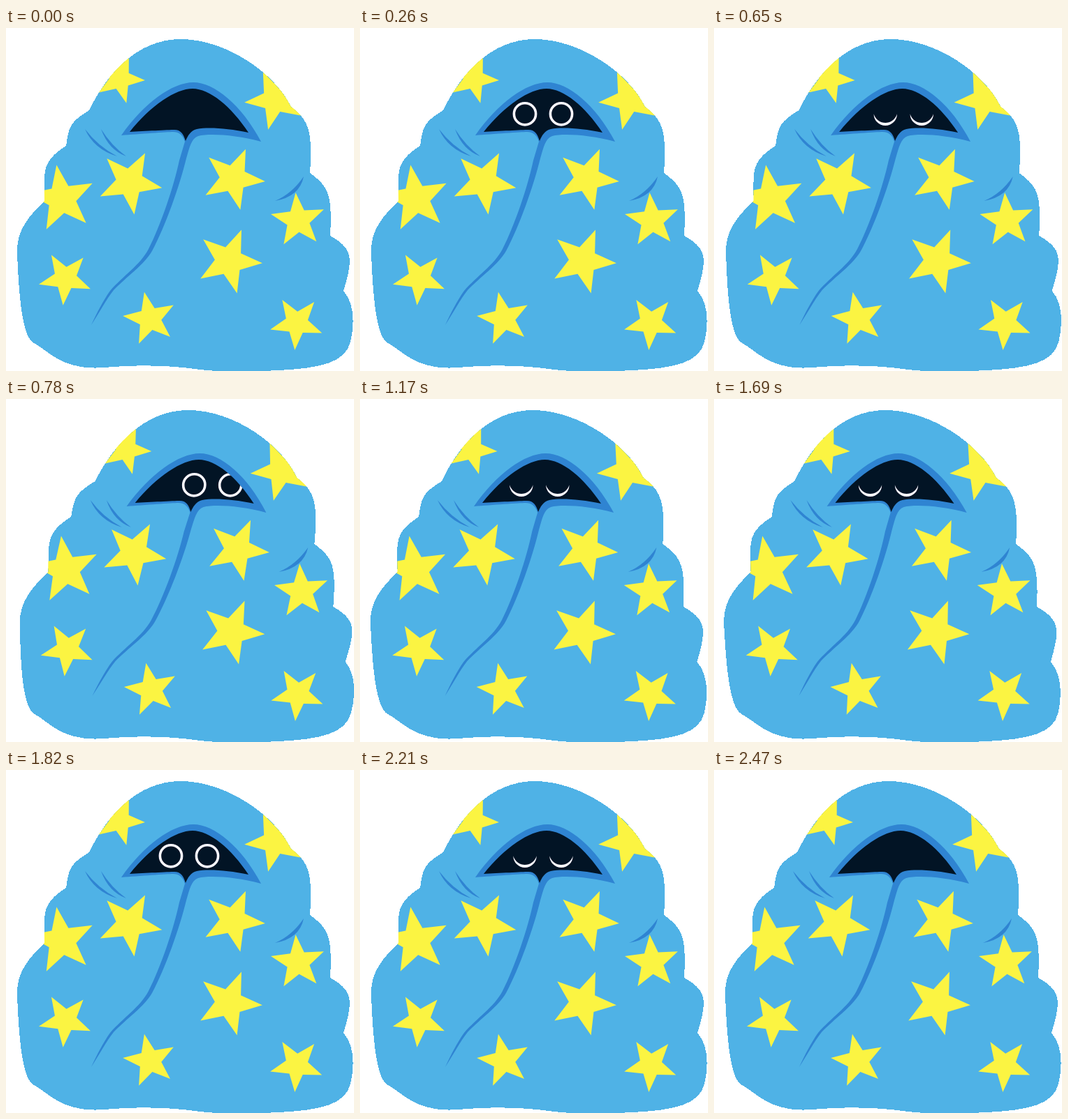
An HTML page for the animation above (3120 ms loop, 498 by 492 pixels).

```html
<!DOCTYPE html>
<html lang="en">
<head>
<meta charset="utf-8">
<title>Starry blanket</title>
<style>
  html, body { margin: 0; width: 100%; height: 100%; overflow: hidden; background: #fff; }
  svg { display: block; width: 100%; height: 100%; }
</style>
</head>
<body>
<svg viewBox="0 0 498 492">
  <defs>
    <path id="outline" d="M119 118C142 70 185 16 250 16S385 65 408 113C434 132 439 150 435 208
      C462 228 467 238 464 298C497 317 497 330 483 377C497 393 500 420 493 450S450 488 390 491
      S300 493 270 489S200 482 140 487S60 462 40 452S18 360 16 325S33 270 55 248
      C55 205 50 192 86 169C90 140 92 135 119 118Z"/>
    <path id="hollow" d="M177 149C207 111 243 87 267 87S322 112 347 150C318 144 290 142 273 145
      C264 147 260 155 257 162C254 152 250 146 241 146S198 148 177 149Z"/>
    <clipPath id="inBody"><use href="#outline"/></clipPath>
    <clipPath id="inHollow"><use href="#hollow"/></clipPath>
  </defs>
  <g id="blanket">
    <use href="#outline" fill="#4fb2e6" shape-rendering="crispEdges"/>
    <g id="stars" fill="#fbf442" clip-path="url(#inBody)"></g>
    <g fill="#2f84d2">
      <path d="M165 154C197 108 238 78 268 78S337 110 365 163C328 153 291 151 275 155
        C265 159 263 170 258 187C248 228 228 284 210 318C199 339 172 357 154 376C143 390 133 409 122 426
        C131 407 139 391 149 377C167 356 192 340 204 317C221 284 240 228 248 190L256 163
        C253 153 247 149 239 149S190 152 165 154Z"/>
      <path d="M113 145Q126 174 159 184Q132 170 113 145Z"/>
      <path d="M136 145Q147 175 172 184Q151 169 136 145Z"/>
      <path d="M426 213Q420 242 385 248Q409 238 426 213Z"/>
    </g>
    <use href="#hollow" fill="#021425"/>
    <g clip-path="url(#inHollow)"><g id="eyes"></g></g>
  </g>
</svg>
<script>
const LOOP = 3120, STEP = 130, GROUND = 490;
const $ = id => document.getElementById(id);
const mix = (a, b, part) => a + (b - a) * part;

// A regular five-pointed star; turn is the direction of its first tip in degrees.
function star(x, y, radius, turn) {
  const points = Array.from({ length: 10 }, (_, i) => {
    const angle = (turn + 36 * i) * Math.PI / 180;
    const r = i % 2 ? radius * .42 : radius;
    return [x + r * Math.cos(angle), y + r * Math.sin(angle)];
  });
  return `<polygon points="${points.join(' ')}"/>`;
}
$('stars').innerHTML =
  star(163, 73, 36, -69) + star(385, 103, 44, -113) +
  star(177, 221, 47, -62) + star(80, 245, 49, -99) +
  star(325, 216, 46, -67) + star(418, 276, 40, -95) +
  star(85, 359, 39, -121) + star(319, 334, 48, -68) +
  star(206, 417, 39, -102) + star(416, 423, 39, -122);

const openEye = '<circle r="15.6" fill="none" stroke="#faf7ff" stroke-width="3.6"/>';
const shutEye = '<path d="M-16.7 0A16.7 16.7 0 0 0 16.7 0C11.5 17 -11.5 17 -16.7 0Z" fill="#faf7ff"/>';

// Each look begins with a one-step blink, during which part of the move is done.
const rest = { start: STEP, lean: 0, gaze: 0, part: 0 };
const looks = [
  rest,
  { start: 5 * STEP, lean: .0225, gaze: 25, part: .28 },
  { start: 9 * STEP, lean: -.0205, gaze: -17.5, part: .66 },
  { ...rest, start: 13 * STEP, part: .5 }
];
const closing = 17 * STEP, gone = 19 * STEP;

function draw() {
  const time = performance.now() % LOOP;
  const index = Math.max(0, looks.findLastIndex(look => look.start <= time));
  const look = looks[index], before = looks[index - 1] ?? rest;
  const blinking = time < look.start + STEP;
  const part = blinking ? look.part : 1;
  const lean = mix(before.lean, look.lean, part);
  const gaze = mix(before.gaze, look.gaze, part);

  const visible = time >= STEP && time < gone;
  const eye = blinking || time >= closing ? shutEye : openEye;
  const droop = time >= closing + STEP ? .5 : 1;

  // Shear about the ground line.
  $('blanket').setAttribute('transform', `matrix(1 0 ${-lean} 1 ${GROUND * lean} 0)`);
  $('eyes').innerHTML = visible ? [236, 288].map(x =>
    `<g transform="translate(${x + gaze} 123.3) scale(1 ${droop})">${eye}</g>`).join('') : '';
  requestAnimationFrame(draw);
}
draw();
</script>
</body>
</html>
```
